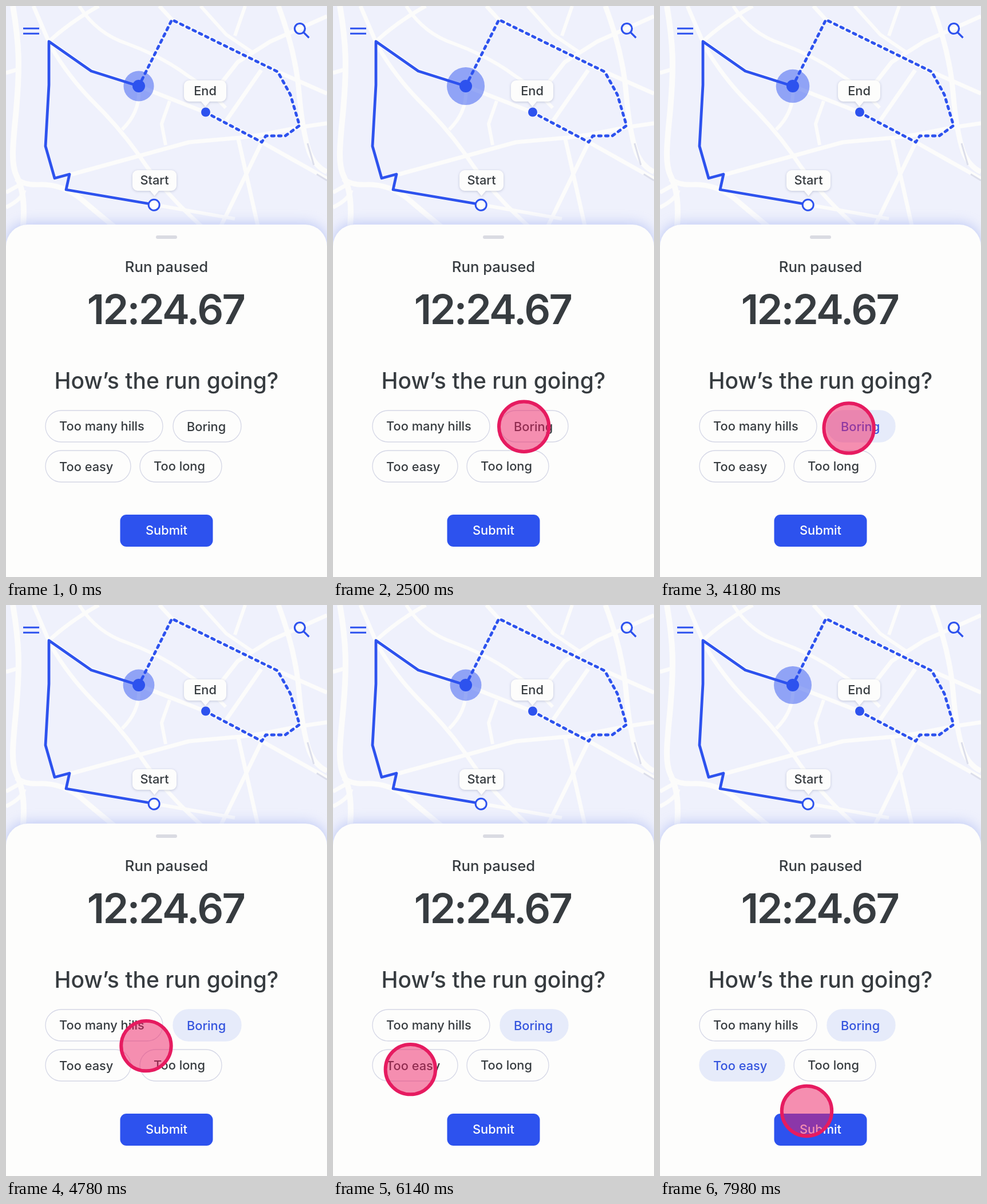
These frames come from a looping animation (561 by 998 pixels, 8000 ms). An HTML page:

```html
<!DOCTYPE html>
<html lang="en">
<head>
<meta charset="utf-8">
<title>Run paused</title>
<style>
  html, body { margin: 0; width: 100%; height: 100%; overflow: hidden; background: #fdfdfc; }
  svg { display: block; width: 100vw; height: 100vh; }
  text { font-family: Inter, "Open Sans", sans-serif; font-weight: 500; font-size: 21.8px; fill: #373c40; }
  .mid { text-anchor: middle; }
  .timer { font-size: 72px; font-weight: 600; letter-spacing: -.037em; font-feature-settings: "calt" 0; }
  .title { font-size: 39px; }
  .status { font-size: 25.7px; }
  .roads path { fill: none; stroke: #fcfcfb; stroke-linejoin: round; }
  .line { fill: none; stroke: #2d52ee; stroke-linejoin: round; }
  .blue { fill: #2d52ee; }
  .label { fill: #fdfdfc; filter: drop-shadow(0 1px 2px #8087a866); }
</style>
</head>
<body>
<svg viewBox="0 0 561 998" preserveAspectRatio="none">
  <defs>
    <filter id="soft" x="-20%" y="-20%" width="140%" height="140%"><feGaussianBlur stdDeviation="11"/></filter>
  </defs>

  <rect width="561" height="440" fill="#eff1fc"/>
  <g class="roads">
    <path stroke-width="10" d="M12 0C24 70 24 110 18 180C13 235 7 275 19 298C29 318 34 345 29 395"/>
    <path stroke-width="9" d="M18 302Q32 314 62 312Q100 312 132 338Q160 362 192 388"/>
    <path stroke-width="9" d="M476 0Q506 80 512 150Q518 220 530 255Q540 280 561 290"/>
    <path stroke-width="7" d="M0 117L20 111M0 326L30 309M0 352Q28 338 32 322"/>
    <path stroke-width="7" d="M48 0L78 70Q108 122 150 165Q204 218 240 272Q280 330 345 388"/>
    <path stroke-width="7" d="M75 62L149 113L232 140L349 186L447 238L561 302"/>
    <path stroke-width="7" d="M75 62Q112 28 162 0"/>
    <path stroke-width="6" d="M128 0Q158 48 212 66Q272 88 318 122Q350 142 384 178"/>
    <path stroke-width="7" d="M112 295L320 238Q365 234 410 230L447 225L513 212L561 205"/>
    <path stroke-width="7" d="M268 0L290 24L475 115L561 153"/>
    <path stroke-width="7" d="M561 18L462 62L405 98L372 140M446 112L385 200"/>
    <path stroke-width="6" d="M340 0L385 50L432 82M418 0L400 52"/>
    <path stroke-width="7" d="M405 228L441 388M447 238L374 388"/>
    <path stroke-width="6" d="M232 140Q236 184 203 216M286 166L272 206L279 243"/>
    <path stroke-width="6" d="M105 321L258 347L400 372"/>
    <path style="stroke:#dcdeeb" stroke-width="3" d="M527 240L538 278M543 294L561 305"/>
  </g>

  <path class="line" stroke-width="4.8"
    d="M258 347L105 321L111 294L85 301L69 245L75 138L75 62L149 113.700L232 140"/>
  <path class="line" stroke-width="4.9" stroke-linecap="round" stroke-dasharray="4.6 7.6"
    d="M232 140L290 24L475 115L497 155L513 209L488 227L454 227L447 238L349 186"/>
  <circle id="halo" class="blue" cx="232" cy="140" fill-opacity=".49"/>
  <circle class="blue" cx="232" cy="140" r="11"/>
  <circle class="blue" cx="349" cy="185.5" r="8"/>
  <circle class="line" cx="258.7" cy="347.7" r="9.5" stroke-width="3" style="fill:#fdfdfc"/>

  <path class="label" d="M320 130H376a9 9 0 0 1 9 9V158a9 9 0 0 1-9 9H356L348.5 176L341 167H320a9 9 0 0 1-9-9V139a9 9 0 0 1 9-9Z"/>
  <path class="label" d="M230 287H289a9 9 0 0 1 9 9V314a9 9 0 0 1-9 9H267L259.5 332L252 323H230a9 9 0 0 1-9-9V296a9 9 0 0 1 9-9Z"/>
  <text class="mid" x="348" y="156">End</text>
  <text class="mid" x="259.5" y="312">Start</text>

  <path class="line" stroke-width="3" d="M30 39.2H58M30 48.2H58"/>
  <path class="line" stroke-width="3.2" d="M520 46L529.5 55.5"/>
  <circle class="line" stroke-width="3.2" cx="513.5" cy="39.5" r="9"/>

  <rect y="380" width="561" height="150" rx="38" fill="#93a5ef" opacity=".55" filter="url(#soft)"/>
  <path fill="#fdfdfc" d="M0 420A38 38 0 0 1 38 382H523A38 38 0 0 1 561 420V998H0Z"/>
  <rect x="262" y="401" width="37" height="6" rx="3" fill="#dadbe2"/>

  <text class="mid status" x="280.5" y="465">Run paused</text>
  <text class="mid timer" x="279" y="556">12:24.67</text>
  <text class="mid title" x="280.5" y="669">How’s the run going?</text>

  <g id="chips"></g>

  <rect class="blue" x="199.5" y="889" width="162" height="56" rx="11"/>
  <text class="mid" x="280.5" y="923.5" style="fill:#fdfdfc">Submit</text>

  <g id="touch">
    <circle r="44" fill="#ec1c60" fill-opacity=".49"/>
    <circle r="43.7" fill="none" stroke="#e61b60" stroke-width="6"/>
  </g>
</svg>

<script>
const LOOP = 8000;
const $ = id => document.getElementById(id);

// label, left, top, width, baseline, time of selection
const chips = [
  ['Too many hills', 69, 707, 205, 741.5],
  ['Boring', 292, 707, 119, 743, 3300],
  ['Too easy', 69, 777, 149, 813, 6200],
  ['Too long', 234, 777, 143, 811.5]
].map(([label, x, y, w, base, at = Infinity]) => {
  const add = (name, attrs) => {
    const el = document.createElementNS('http://www.w3.org/2000/svg', name);
    for (const key in attrs) el.setAttribute(key, attrs[key]);
    return $('chips').appendChild(el);
  };
  const box = add('rect', { x, y, width: w, height: 55, rx: 27.5, 'stroke-width': 1.3 });
  const text = add('text', { x: x + 24, y: base });
  text.textContent = label;
  return { box, text, at };
});

// time, x, y, eased arrival
const path = [
  [1330, 275, 841],
  [2350, 334, 735, true],
  [4250, 330, 738],
  [5350, 141, 810.5, true],
  [7100, 128.5, 813],
  [8050, 256.7, 884.6, true]
];

const clamp = v => Math.min(1, Math.max(0, v));
const ease = v => v < .5 ? 4 * v ** 3 : 1 - 4 * (1 - v) ** 3;
const mix = (a, b, k) => `rgb(${a.map((v, i) => Math.round(v + (b[i] - v) * k))})`;

function touchAt(t) {
  const i = Math.max(1, path.findIndex(p => p[0] > t));
  const [t0, x0, y0] = path[i - 1], [t1, x1, y1, eased] = path[i];
  let k = clamp((t - t0) / (t1 - t0));
  if (eased) k = ease(k);
  return [x0 + (x1 - x0) * k, y0 + (y1 - y0) * k];
}

function draw(t) {
  $('halo').setAttribute('r', 29.8 + 3.3 * Math.cos((t - 2650) / 5600 * 2 * Math.PI));
  for (const { box, text, at } of chips) {
    const k = clamp((t - at) / 200);
    box.style.fill = mix([253, 253, 252], [230, 235, 250], k);
    box.style.stroke = mix([213, 215, 230], [230, 235, 250], k);
    text.style.fill = mix([55, 60, 64], [52, 84, 222], k);
  }
  $('touch').setAttribute('transform', `translate(${touchAt(t)})`);
  $('touch').setAttribute('opacity', clamp((t - 1430) / 480));
}

const start = performance.now();
function tick() {
  draw((performance.now() - start) % LOOP);
  requestAnimationFrame(tick);
}
tick();
</script>
</body>
</html>
```
